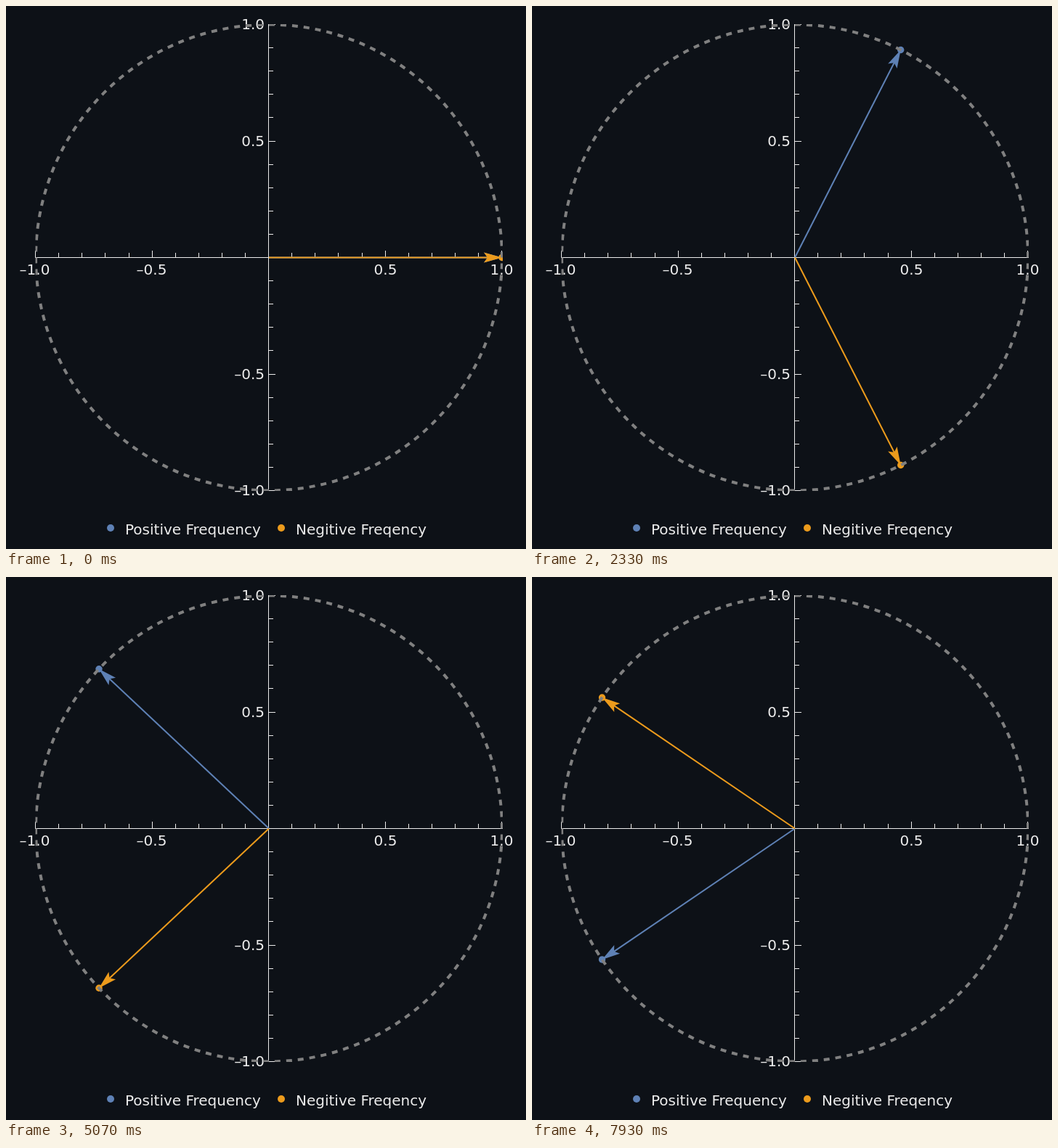
Write an HTML page with a canvas that moves like this. It is 716 px wide and 748 px high and loops after 8 s.

```html
<!DOCTYPE html>
<html lang="en">
<head>
<meta charset="utf-8">
<title>Positive and negative frequency</title>
<style>
  html, body { margin: 0; width: 100%; height: 100%; overflow: hidden; background: #0d1117; }
  canvas { display: block; }
</style>
</head>
<body>
<canvas id="stage" width="716" height="748"></canvas>
<script>
const ctx = document.getElementById('stage').getContext('2d');
const BACKGROUND = '#0d1117', INK = '#ececec', GRAY = '#808080';
const BLUE = '#5e81b5', ORANGE = '#ec9b1c';
const CX = 362, CY = 346.5, RADIUS = 321;
const LOOP = 8000, STEP = 200 / 3, STEP_ANGLE = Math.PI / 100;

function text(label, x, y, align) {
  ctx.font = '20px "DejaVu Sans", sans-serif';
  ctx.textAlign = align;
  ctx.fillStyle = INK;
  ctx.fillText(label, x, y);
}

function dot(x, y, radius, color) {
  ctx.fillStyle = color;
  ctx.beginPath();
  ctx.arc(x, y, radius, 0, 2 * Math.PI);
  ctx.fill();
}

function drawAxes() {
  ctx.fillStyle = INK;
  ctx.fillRect(40, 346, 644, 1);
  ctx.fillRect(361, 25, 1, 643);
  for (let i = -10; i <= 10; i++) {
    if (i === 0) continue;
    const major = i % 5 === 0;
    const length = major ? 9 : 6;
    const x = Math.floor(361.6 + i * 32.1);
    const y = Math.floor(CY - i * 32.1);
    ctx.fillStyle = INK;
    ctx.fillRect(x, 346 - length, 1, length);
    ctx.fillRect(362, y, length, 1);
    if (major) {
      const label = (i < 0 ? '–' : '') + Math.abs(i / 10).toFixed(1);
      text(label, x + (i < 0 ? -0.5 : 0.5), 370, 'center');
      text(label, 356, y + 7, 'right');
    }
  }
}

function drawLegend() {
  dot(144, 719, 5, BLUE);
  text('Positive Frequency', 164, 728, 'left');
  dot(379, 719, 5, ORANGE);
  text('Negitive Freqency', 399, 728, 'left');
}

function drawArrow(angle, color) {
  ctx.save();
  ctx.translate(CX, CY);
  ctx.rotate(-angle);
  ctx.strokeStyle = ctx.fillStyle = color;
  ctx.lineWidth = 2;
  ctx.beginPath();
  ctx.moveTo(0, 0);
  ctx.lineTo(RADIUS - 18, 0);
  ctx.stroke();
  ctx.beginPath();
  ctx.moveTo(RADIUS, 0);
  ctx.lineTo(RADIUS - 25, -7);
  ctx.lineTo(RADIUS - 20, 0);
  ctx.lineTo(RADIUS - 25, 7);
  ctx.fill();
  ctx.restore();
}

function drawCircle() {
  ctx.strokeStyle = GRAY;
  ctx.lineWidth = 4;
  ctx.setLineDash([8, 8]);
  ctx.beginPath();
  ctx.arc(CX, CY, RADIUS, 0, -2 * Math.PI, true);
  ctx.stroke();
  ctx.setLineDash([]);
}

function draw(time) {
  // Steps run at 15 per second, on a 10 ms clock.
  const clock = Math.floor((time % LOOP) / 10) * 10;
  const angle = Math.floor((clock + 3.4) / STEP) * STEP_ANGLE;
  const vectors = [[angle, BLUE], [-angle, ORANGE]];

  ctx.fillStyle = BACKGROUND;
  ctx.fillRect(0, 0, 716, 748);
  drawAxes();
  drawLegend();

  ctx.save();
  ctx.beginPath();
  ctx.rect(40.5, 25, 643.5, 643);
  ctx.clip();
  for (const [a, color] of vectors) drawArrow(a, color);
  for (const [a, color] of vectors) {
    dot(CX + RADIUS * Math.cos(a), CY - RADIUS * Math.sin(a), 4.7, color);
  }
  drawCircle();
  ctx.restore();
}

const start = performance.now();
function tick() {
  draw(performance.now() - start);
  requestAnimationFrame(tick);
}
tick();
</script>
</body>
</html>
```
